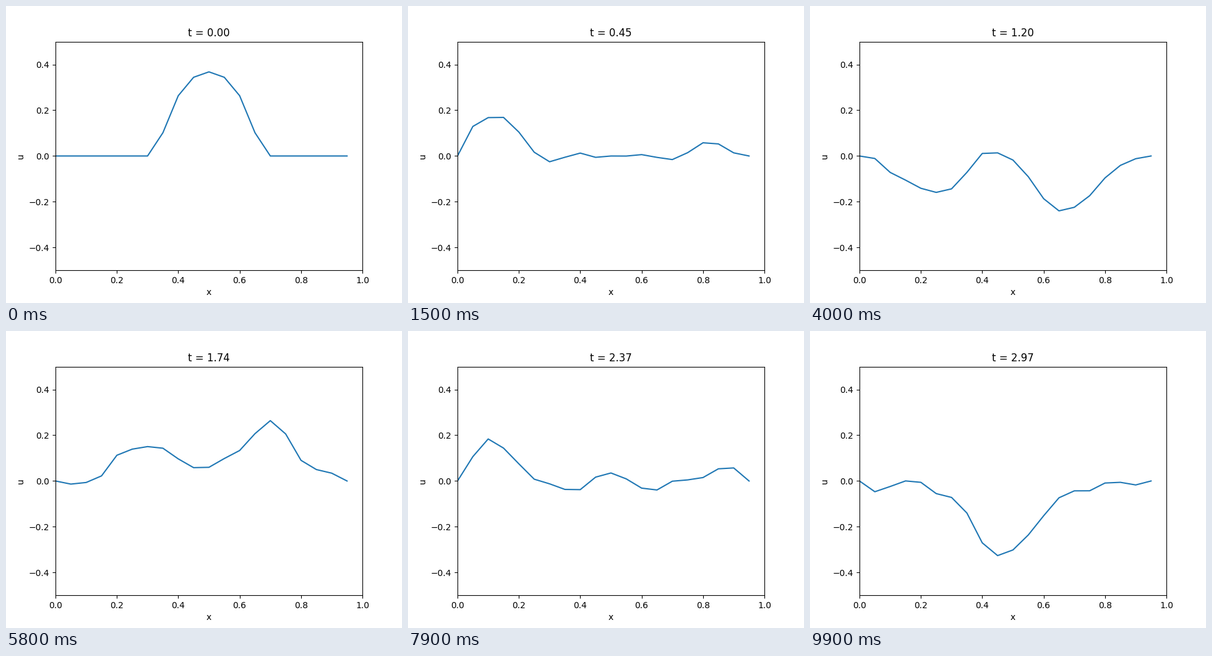
A matplotlib script that plays this animation: 640x480 px, repeating every 10 s.

```python
import numpy as np
import matplotlib.pyplot as plt
from matplotlib.animation import FuncAnimation

FRAMES = 100
INTERVAL = 100
DX, DT = 0.05, 0.03
R2 = (DT / DX) ** 2

x = DX * np.arange(20)


def solve():
    """Leapfrog solution of u_tt = u_xx with fixed ends and a smooth bump."""
    s = (x - 0.5) / 0.2
    inside = np.abs(s) < 1 - 1e-9
    q = 1 - s[inside] ** 2

    u = np.zeros((FRAMES, x.size))
    speed = np.zeros(x.size)
    u[0, inside] = np.exp(-1 / q)
    speed[inside] = -2 * s[inside] / q**2 * np.exp(-1 / q)

    u[1] = u[0] + DT * speed
    for n in range(1, FRAMES - 1):
        bend = u[n, 2:] - 2 * u[n, 1:-1] + u[n, :-2]
        u[n + 1, 1:-1] = 2 * u[n, 1:-1] - u[n - 1, 1:-1] + R2 * bend
    return u


wave = solve()

fig, ax = plt.subplots(figsize=(6.4, 4.8), dpi=100)
line, = ax.plot(x, wave[0])
ax.set_xlim(0, 1)
ax.set_ylim(-0.5, 0.5)
ax.set_xlabel("x")
ax.set_ylabel("u")
title = ax.set_title("t = 0.00")


def update(n):
    line.set_ydata(wave[n])
    title.set_text(f"t = {n * DT:.2f}")
    return line, title


anim = FuncAnimation(fig, update, frames=FRAMES, interval=INTERVAL,
                     repeat=True, repeat_delay=0, blit=False)
plt.show()
```
